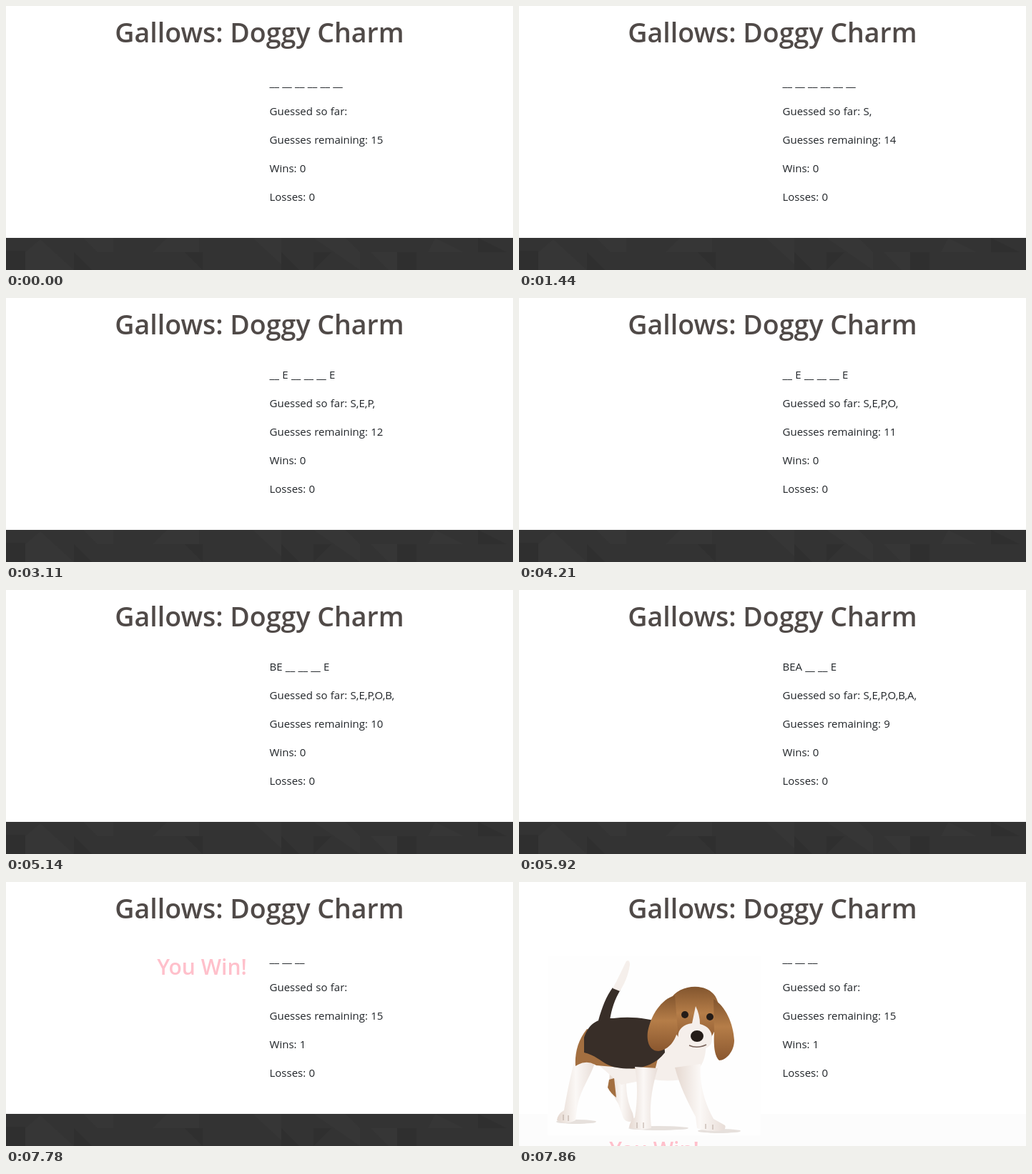
An HTML page that plays this animation: 709x370 px, repeating every 7930 ms.

```html
<!DOCTYPE html>
<html lang="en">
<head>
<meta charset="utf-8">
<title>Word game</title>
<style>
  html, body { margin: 0; width: 100%; height: 100%; overflow: hidden; background: #fff; }
  svg { display: block; width: 709px; height: 370px; }
  text { font: 15px "Open Sans", "Noto Sans", sans-serif; fill: #212529; word-spacing: .4px; }
  .title { font-size: 37.5px; font-weight: 600; fill: #504a48; text-anchor: middle; word-spacing: 0; }
  .win { font-size: 30px; font-weight: 600; fill: #ffc0cb; text-anchor: middle; word-spacing: 0; }
  .white { fill: #f5efeb; }
  .brown { fill: #a36f40; }
  .dark { fill: #382e28; }
</style>
</head>
<body>
<svg viewBox="0 0 709 370">
  <defs>
    <linearGradient id="fur" x1="0" y1="0" x2="0" y2="1">
      <stop offset="0" stop-color="#82552e"/>
      <stop offset=".45" stop-color="#b57d48"/>
      <stop offset="1" stop-color="#8a572f"/>
    </linearGradient>
    <linearGradient id="leg" x1="0" y1="0" x2="1" y2="0">
      <stop offset="0" stop-color="#e5d8d0"/>
      <stop offset=".5" stop-color="#fbf8f6"/>
      <stop offset="1" stop-color="#e8ddd7"/>
    </linearGradient>
  </defs>

  <text class="title" x="354.5" y="51">Gallows: Doggy Charm</text>

  <g id="footer">
    <rect y="325" width="709" height="45" fill="#333"/>
    <g fill="#363636">
      <path d="M27 370V345L48 327 95 370ZM108 325H150V345H128ZM205 345L225 325H270V345ZM345 325L385 362V325ZM430 325H475L495 345V370ZM510 345H547V370H535ZM600 325L640 345H590Z"/>
    </g>
    <g fill="#2f2f2f">
      <path d="M0 343H27V370H0ZM95 345L120 370H95ZM250 345H275V370ZM385 345L410 370H385ZM430 345H455L430 370ZM547 345H574V370H547ZM660 325L700 345H660Z"/>
    </g>
  </g>

  <g id="photo">
    <rect y="325" width="709" height="45" fill="#fcfcfc"/>
    <rect x="40" y="104" width="298" height="251" fill="#fefefe"/>
    <g fill="#e6e0dc">
      <ellipse cx="80" cy="336" rx="28" ry="3"/>
      <ellipse cx="195" cy="345" rx="42" ry="3"/>
      <ellipse cx="280" cy="349" rx="30" ry="3"/>
    </g>
    <path class="dark" d="M111 194C116 176 122 160 131 148L142 151C134 164 129 179 127 194Z"/>
    <path class="white" d="M131 149C138 137 145 121 150 111Q155 108 155 116C153 130 148 142 141 153Z"/>
    <path fill="url(#leg)" d="M127 264L151 262C149 282 149 304 159 324L161 334Q151 339 146 331L139 311Q131 299 126 285Z"/>
    <path class="brown" d="M126 277L133 275 136 302Q128 296 124 288Z"/>
    <path fill="url(#leg)" d="M79 246L106 254C98 277 85 292 81 318L79 334Q65 341 53 334Q54 325 63 320C67 297 72 270 79 246Z"/>
    <path class="white" d="M148 238L205 196 261 222C263 248 255 262 238 274Q213 282 184 276L143 284 112 257Z"/>
    <path class="brown" d="M95 206C82 222 78 240 79 258Q94 248 108 257L190 264 196 240Z"/>
    <path class="dark" d="M91 218C97 199 110 190 132 191C158 188 181 191 201 198L204 239C190 258 165 265 137 260C119 258 112 244 91 239Z"/>
    <path fill="url(#leg)" d="M162 259L194 261C187 285 183 305 184 331L185 345Q169 349 154 344Q155 335 162 330C166 305 166 281 162 259Z"/>
    <path fill="url(#leg)" d="M218 260L254 255C252 280 258 307 272 332L288 341Q291 348 279 349Q261 350 249 345L247 329C235 307 225 286 218 260Z"/>
    <path fill="none" stroke="#b5a49b" d="M62 326v8M69 327v8M165 337v8M174 337v8M261 339v7M271 340v7"/>
    <path fill="url(#fur)" d="M211 166C221 145 255 141 270 155C283 166 281 190 276 204L263 229H232L215 207C208 191 206 178 211 166Z"/>
    <path fill="url(#fur)" d="M218 159C199 164 184 187 180 210C178 226 184 237 195 237C210 235 219 222 222 207Z"/>
    <path fill="url(#fur)" d="M272 164C289 174 300 199 301 222C301 237 290 250 280 250C273 244 272 227 273 210Z"/>
    <path class="white" d="M247 174Q253 186 253 199C265 202 273 211 269 226C262 239 235 237 224 224C219 210 227 200 242 198Z"/>
    <g fill="#241c18">
      <ellipse cx="232" cy="186" rx="5" ry="5"/>
      <ellipse cx="267" cy="189" rx="5" ry="5"/>
      <ellipse cx="249" cy="216" rx="9" ry="8"/>
    </g>
    <path d="M238 229Q249 234 262 228" fill="none" stroke="#78635a" stroke-width="1.5"/>
  </g>

  <text class="win" id="win">You Win!</text>
  <g id="rows"></g>
</svg>
<script>
const LOOP = 7930;
// [start ms, word, guessed letters, guesses remaining, wins]
const steps = [
  [0, "__ __ __ __ __ __", "", 15, 0],
  [1440, "__ __ __ __ __ __", "S,", 14, 0],
  [2090, "__ E __ __ __ E", "S,E,", 13, 0],
  [3110, "__ E __ __ __ E", "S,E,P,", 12, 0],
  [4210, "__ E __ __ __ E", "S,E,P,O,", 11, 0],
  [5140, "BE __ __ __ E", "S,E,P,O,B,", 10, 0],
  [5920, "BEA __ __ E", "S,E,P,O,B,A,", 9, 0],
  [6770, "BEAG __ E", "S,E,P,O,B,A,G,", 8, 0],
  [7780, "__ __ __", "", 15, 1],
  [7860, "__ __ __", "", 15, 1]
];
const PHOTO_AT = 7860;
const byId = id => document.getElementById(id);
const show = (id, on) => byId(id).setAttribute("visibility", on ? "visible" : "hidden");

const rows = [113, 153, 193, 233, 273].map(y => {
  const row = document.createElementNS("http://www.w3.org/2000/svg", "text");
  row.setAttribute("x", 368.5);
  row.setAttribute("y", y);
  return byId("rows").appendChild(row);
});

function render([start, word, guessed, left, wins]) {
  const lines = [word, `Guessed so far: ${guessed}`, `Guesses remaining: ${left}`,
    `Wins: ${wins}`, "Losses: 0"];
  rows.forEach((row, i) => { row.textContent = lines[i]; });
  const photo = start >= PHOTO_AT;
  show("photo", photo);
  show("footer", !photo);
  show("win", wins > 0);
  byId("win").setAttribute("x", photo ? 189 : 274);
  byId("win").setAttribute("y", photo ? 386 : 130);
}

let current;
const origin = performance.now();
function tick() {
  const time = Math.max(0, performance.now() - origin) % LOOP;
  const step = steps.findLast(([start]) => start <= time);
  if (step !== current) render(current = step);
  requestAnimationFrame(tick);
}
tick();
</script>
</body>
</html>
```
